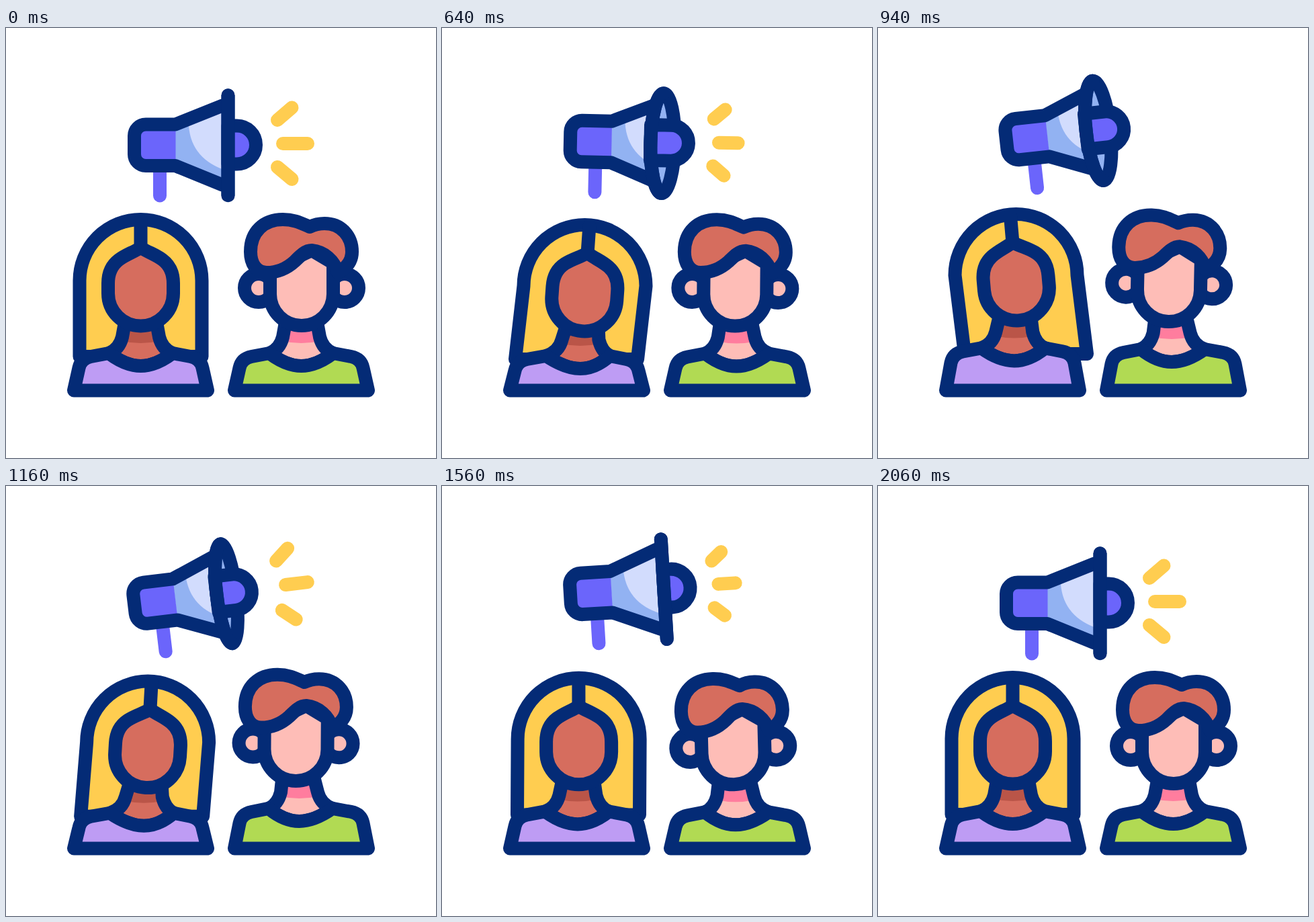
Write an HTML page that moves like this. It is 640 px wide and 640 px high and loops after 2360 ms.

```html
<!DOCTYPE html>
<html lang="en">
<head>
<meta charset="utf-8">
<title>Announcement</title>
<style>
  html, body { margin: 0; width: 100%; height: 100%; overflow: hidden; background: #fff; }
  svg { display: block; width: 100vw; height: 100vh; }
  .ink { stroke: #042b76; stroke-width: 20; stroke-linejoin: round; stroke-linecap: round; }
  .ray { stroke: #ffcd50; stroke-width: 20; stroke-linecap: round; }
</style>
</head>
<body>
<svg viewBox="0 0 640 640">
  <g id="woman">
    <path id="hair" class="ink" fill="#ffcd50"/>
    <path class="neck" fill="#d66d5e"/>
    <path class="shade" fill="#ba5548"/>
    <path class="neck ink" fill="none"/>
    <path class="shirt ink" fill="#be9cf4"/>
    <g class="head">
      <path class="ink" d="M200.5 286V327" fill="none"/>
      <path class="ink" fill="#d66d5e" d="M200.5 327C214 335 222 337 233 345Q249 357 249 380V395A48.5 48.5 0 0 1 152 395V380Q152 357 168 345C179 337 187 335 200.5 327Z"/>
    </g>
  </g>
  <g id="man">
    <path class="neck" fill="#febdb7"/>
    <path class="shade" fill="#ff7d9e"/>
    <path class="neck ink" fill="none"/>
    <path class="shirt ink" fill="#b1da53"/>
    <g class="head">
      <circle class="ink" cx="376" cy="387" r="21" fill="#febdb7"/>
      <circle class="ink" cx="504" cy="387" r="21" fill="#febdb7"/>
      <path class="ink" fill="#febdb7" d="M393 360V396A47 47 0 0 0 487 396V350L455 331Z"/>
      <path class="ink" fill="#d66d5e" d="M388 364C372 364 364 350 364 333C364 303 384 285 412 285C430 285 440 291 452 296C460 292 467 291 474 291C500 291 515 311 515 333C515 347 507 357 494 364C488 346 474 333 455 331C445 331 437 340 430 347C418 358 405 364 388 364Z"/>
    </g>
  </g>
  <g id="megaphone">
    <path d="M229 200V249.5" stroke="#6b65fb" stroke-width="20" stroke-linecap="round"/>
    <path fill="#92b2f2" d="M252 143.5L330 112.5V237L252 205Z"/>
    <path fill="#d2dcfd" d="M272 135L330 112.5V213Q276 196 272 146Z"/>
    <path fill="#6b65fb" d="M191 143.5H252.500V205H191Z"/>
    <path class="ink" fill="none" d="M322 115.500L252 143.500H208A17 17 0 0 0 191 160.500V188A17 17 0 0 0 208 205H252L322 233.500"/>
    <ellipse id="mouth" class="ink" fill="#92b2f2" cy="174.750" ry="74.500"/>
    <path id="nub" class="ink" fill="#6b65fb"/>
    <path id="rim" class="ink" fill="none"/>
    <g id="rays"></g>
  </g>
</svg>
<script>
const LOOP = 2360, START = 200, END = 2060, BEAT = 465;
const TIMES = [START, 360, 640, 840, 940, 1110, 1380, 1570, 1740, END];
const TRACKS = {
  megaTilt:  [0, 2.7, 1.2, -4, -6.3, -7, -4.2, -3.4, -2.5, 0],
  megaY:     [0, 4.9, -6, -13, -6.8, 0, 8, -13, -3.5, 0],
  open:      [0, 0, 1, 1, 1, 0.9, 0.13, 0, 0, 0],
  nubIn:     [0, 0, 5, 5, 5, 5, 5.5, 2, 0, 0],
  womanX:    [0, -1.5, 12, 6, 5, 11, 5.5, 3, 1.3, 0],
  womanY:    [0, -8, 8, -5, -8, 7, -9, 1, 2.5, 0],
  womanTilt: [0, -2, 4, -3, -5, 4, -4.5, 0, 1, 0],
  hairEndX:  [0, 6, -0.5, 12, 19.5, 0, 18, 2, -2.5, 0],
  manX:      [0, 0, -3.5, -5.5, -6.5, -8, -9.5, -7, -3.5, 0],
  manY:      [0, -1.5, 0.5, -4, -6, -4.5, -2, 1.5, 3, 0],
  manTilt:   [0, 0, 0.5, 1, 1.2, 0.6, -0.8, -1.5, -1.8, 0]
};
const RAYS = [[404, 137, 425.5, 118.5], [412, 172, 449, 172], [404, 207, 425.5, 225]];

const $ = (selector, root = document) => root.querySelector(selector);
const clamp = v => Math.max(0, Math.min(1, v));
const mix = (a, b, k) => a + (b - a) * k;
const set = (el, attrs) => { for (const k in attrs) el.setAttribute(k, attrs[k]); };

const rayLines = RAYS.map(() => {
  const line = document.createElementNS('http://www.w3.org/2000/svg', 'line');
  line.setAttribute('class', 'ray');
  return $('#rays').appendChild(line);
});

// Smooth curve through the keys, flat at every peak.
function sample(keys, t) {
  if (t <= START || t >= END) return 0;
  const i = TIMES.findIndex((time, n) => n && t < time) - 1;
  const slope = n => (keys[n + 1] - keys[n]) / (TIMES[n + 1] - TIMES[n]);
  const tangent = n => {
    if (n === 0 || n === keys.length - 1) return 0;
    const a = slope(n - 1), b = slope(n);
    return a * b > 0 ? 2 * a * b / (a + b) : 0;
  };
  const span = TIMES[i + 1] - TIMES[i], k = (t - TIMES[i]) / span, r = 1 - k;
  return keys[i] * (1 + 2 * k) * r * r + tangent(i) * span * k * r * r
    + keys[i + 1] * k * k * (3 - 2 * k) - tangent(i + 1) * span * k * k * r;
}

function drawBust(root, cx, dx, dy) {
  const top = cx + dx * 0.7, mid = cx + dx * 0.45, low = cx + dx * 0.15;
  const y = v => v + dy;
  const collar = `Q${mid - 22.5} ${y(503)} ${mid} ${y(503)}Q${mid + 22.5} ${y(503)} ${low + 47.5} ${y(484)}`;
  const neck = `M${top - 23.5} ${y(438)}L${mid - 27.5} ${y(460)}Q${mid - 32} ${y(478)} ${low - 47.5} ${y(484)}`
    + collar + `Q${mid + 32} ${y(478)} ${mid + 27.5} ${y(460)}L${top + 23.5} ${y(438)}`;
  root.querySelectorAll('.neck').forEach(el => set(el, { d: neck }));
  set($('.shade', root), {
    d: `M${top - 23} ${y(438)}H${top + 23}L${mid + 28} ${y(466)}Q${mid} ${y(472)} ${mid - 28} ${y(466)}Z`
  });
  set($('.shirt', root), {
    d: `M${cx - 99.5} 539.5L${cx - 92} ${y(506)}Q${cx - 89} ${y(492)} ${cx - 74} ${y(489)}L${low - 47.5} ${y(484)}`
      + collar + `L${cx + 74} ${y(489)}Q${cx + 89} ${y(492)} ${cx + 92} ${y(506)}L${cx + 99.5} 539.5Z`
  });
}

function drawWoman(p) {
  const cx = 200.5 + p.womanX, cy = 376 + p.womanY, r = 91;
  const endX = 200.5 + p.hairEndX, endY = 489 + p.womanY / 2;
  set($('#hair'), { d: `M${endX - r} ${endY}L${cx - r} ${cy}A${r} ${r} 0 0 1 ${cx + r} ${cy}L${endX + r} ${endY}Z` });
  drawBust($('#woman'), 200.5, p.womanX, p.womanY * (p.womanY > 0 ? 0.5 : 0.95));
  set($('#woman .head'), { transform: `translate(${p.womanX} ${p.womanY}) rotate(${p.womanTilt} 200.5 385)` });
}

function drawMan(p) {
  drawBust($('#man'), 439.5, p.manX * 0.8, p.manY);
  set($('#man .head'), { transform: `translate(${p.manX} ${p.manY}) rotate(${p.manTilt} 440 370)` });
}

function drawRays(t) {
  let from = 0, to = 1, shift = 0;
  const u = t - START;
  if (u > 0 && u < 3 * BEAT) {
    const phase = u % BEAT;
    if (phase < 300) {
      from = clamp(phase / 275);
      shift = 37 * from ** 1.35;
    } else {
      to = clamp((phase - 355) / 110);
    }
  }
  $('#rays').style.display = to > from ? '' : 'none';
  RAYS.forEach(([x1, y1, x2, y2], i) => set(rayLines[i], {
    x1: mix(x1, x2, from) + shift, y1: mix(y1, y2, from),
    x2: mix(x1, x2, to) + shift, y2: mix(y1, y2, to)
  }));
}

function drawMegaphone(p, t) {
  const cx = 330.5 - 2 * p.open, rx = 18 * p.open;
  const half = 28.5 - 2 * p.open, right = 372 - p.nubIn;
  set($('#megaphone'), { transform: `translate(0 ${p.megaY}) rotate(${p.megaTilt} 191 174)` });
  set($('#mouth'), { cx, rx: Math.max(rx, 0.01) });
  set($('#nub'), {
    d: `M${cx - rx} ${174 - half}H${right - half}A${half} ${half} 0 0 1 ${right - half} ${174 + half}H${cx - rx}Z`
  });
  set($('#rim'), { d: `M${cx} 249.25A${rx + 0.01} 74.5 0 0 1 ${cx} 100.25` });
  drawRays(t);
}

function draw(t) {
  const pose = {};
  for (const name in TRACKS) pose[name] = sample(TRACKS[name], t);
  drawWoman(pose);
  drawMan(pose);
  drawMegaphone(pose, t);
}

const begin = performance.now();
function tick() {
  const t = (performance.now() - begin) % LOOP;
  draw(Math.floor(t / 20) * 20);
  requestAnimationFrame(tick);
}
tick();
</script>
</body>
</html>
```
